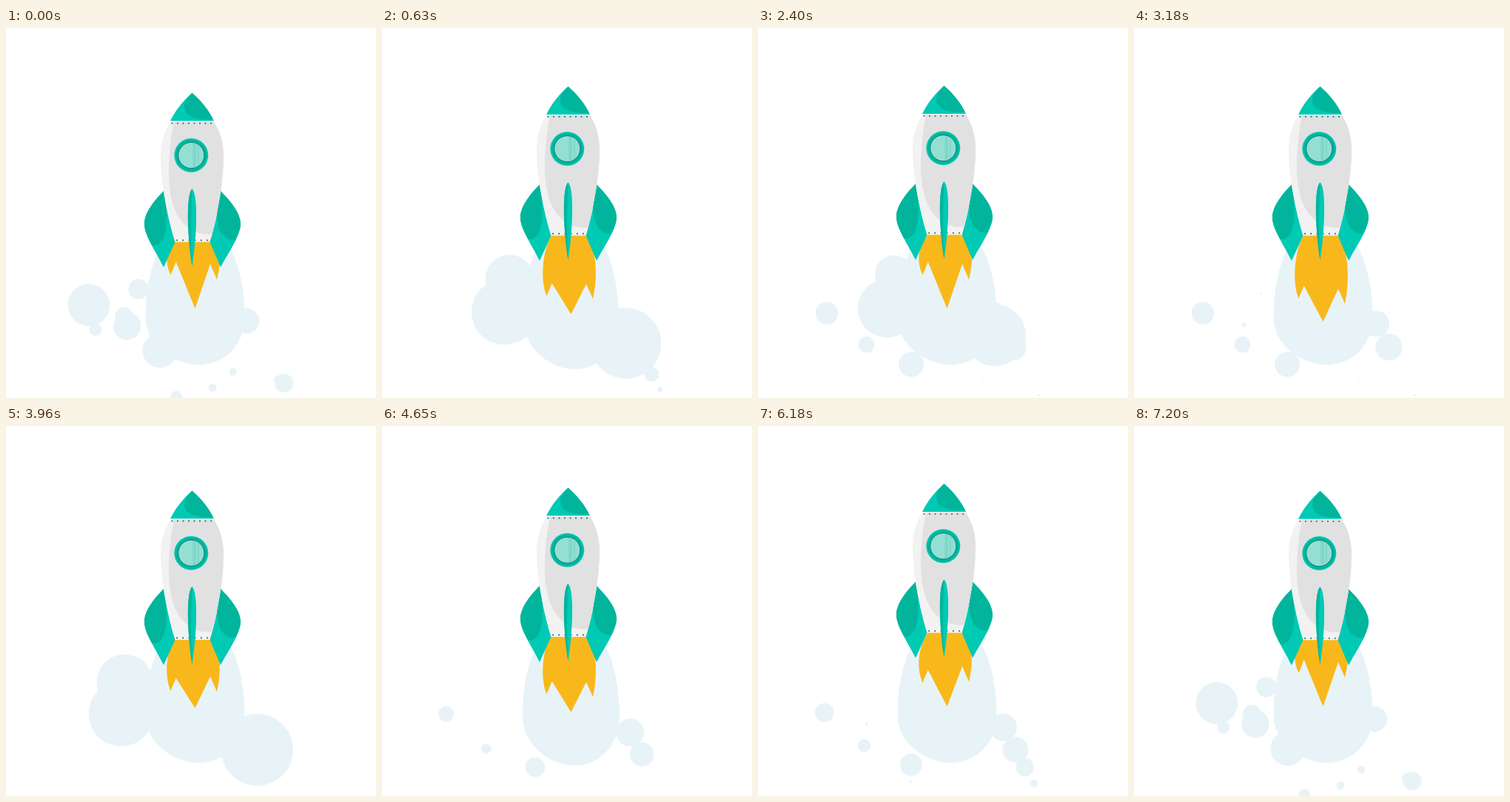
These frames come from a looping animation (500 px wide and 500 px high, 7.23 s). An HTML page:

```html
<!DOCTYPE html>
<html lang="en">
<head>
<meta charset="utf-8">
<title>Rocket</title>
<style>
html, body { margin: 0; width: 100%; height: 100%; overflow: hidden; background: #fff; }
svg { display: block; width: 100vw; height: 100vh; }
.smoke { fill: #e8f3f8; }
.light { fill: #00c9b4; }
.dark { fill: #00b59c; }
</style>
</head>
<body>
<svg viewBox="0 0 500 500">
  <path id="plume" class="smoke"/>
  <path id="puffs" class="smoke"/>
  <path id="flame" fill="#f8b81b"/>
  <g id="rocket">
    <path class="light" d="M213 210.500C204 220 187 238 187 255C187 271 203 293 213 313.500L228.500 279.500C222 258 217 236 213 210.500Z"/>
    <path class="dark" d="M213 210.500C204 220 187 238 187 255C187 265 192 274 197.500 284.500C213 286 219 265 216 229Z"/>
    <path class="light" d="M290 210.500C299 220 317 238 317 255C317 271 301 293 290 313.500L275.500 279.500C282 258 287 236 290 210.500Z"/>
    <path class="dark" d="M290 210.500C299 220 317 238 317 255C317 262 313 270 309.500 277C293 277 284 262 285.500 236Z"/>
    <path fill="#f2f2f2" d="M223 116H281C289 130 294 144 294 164C294 203 284 247 275.500 279.500H228.500C219 247 209 203 209 164C209 144 214 130 223 116Z"/>
    <path fill="#e1e1e1" d="M227 117H281C289 130 294 144 294 164C294 200 286 238 278.500 269C252 271 220 254 220 186C220 160 223 137 227 117Z"/>
    <path class="light" d="M251.500 78C263 88 274 101 281 116H222C229 101 240 88 251.500 78Z"/>
    <path class="dark" d="M251.500 78C263 88 274 101 280 114C258 115 241 110 241 96C241 91 243 86 251.500 78Z"/>
    <path stroke="#f8f8f8" d="M222.500 116.500H280.500"/>
    <g id="rivets" fill="#267f7a"></g>
    <circle class="light" cx="250.300" cy="162.300" r="23"/>
    <circle class="dark" cx="250.300" cy="162.300" r="21.500"/>
    <circle cx="250.300" cy="162.300" r="17.600" fill="#93dfd3" stroke="#0b7d70"/>
    <path fill="#80d6c9" d="M252.500 146H257V178.500H252.500ZM259 148H261V176H259Z"/>
    <path class="light" d="M251.500 207.500C259 214 259 264 251.500 312.500C244 264 244 214 251.500 207.500Z"/>
    <path class="dark" d="M251.500 207.500C244 214 244 264 251.500 312.500C249 270 250 235 251.500 207.500Z"/>
  </g>
</svg>
<script>
const LOOP = 7230, CYCLE = 7200, STEP = 30;
const get = id => document.getElementById(id);
const ease = u => (1 - Math.cos(Math.PI * Math.min(1, Math.max(0, u)))) / 2;
const circle = (x, y, r) => `M${x - r} ${y}a${r} ${r} 0 1 1 ${2 * r} 0a${r} ${r} 0 1 1 ${-2 * r} 0Z`;

// Every burst sends one puff down each route, after that route's delay.
const bursts = [300, 1370, 2150, 3540, 4770, 5110, 6370];
const route = (delay, life, from, to, size) => ({ delay, life, from, to, size });
const routes = [
  // left
  route(20, 1450, [218, 313], [68, 400], 40),
  route(0, 1050, [206, 362], [112, 412], 45),
  route(500, 860, [200, 350], [130, 452], 19),
  route(530, 650, [183, 363], [144, 406], 13.5),
  route(400, 720, [205, 332], [170, 360], 22),
  // below
  route(330, 1250, [210, 378], [206, 486], 24),
  route(530, 700, [228, 470], [232, 520], 8.5),
  route(330, 850, [302, 430], [271, 506], 8.5),
  route(330, 850, [318, 410], [303, 484], 8),
  // right
  route(0, 1100, [288, 378], [388, 494], 49),
  ...[30, 550, 730].map(delay => route(delay, 1150, [295, 340], [384, 504], 19)),
  route(400, 450, [298, 318], [326, 364], 9)
];

// A puff slows down on its way, swells early and then shrinks to nothing.
function puff({ life, from, to, size }, age) {
  const u = age / life, p = 1 - (1 - u) ** 1.5;
  const [x, y] = from.map((v, k) => v + (to[k] - v) * p);
  return circle(x, y, size * Math.sin(Math.PI * u ** .66) ** 2);
}

function puffPath(t) {
  let d = '';
  for (const r of routes) {
    for (const burst of bursts) {
      const age = (t - burst - r.delay + 2 * CYCLE) % CYCLE;
      if (age < r.life) d += puff(r, age);
    }
  }
  return d;
}

// The plume grows long and narrow around two moments.
function plumePath(t) {
  const s = ease(1 - Math.abs(t - 1230) / 840) + ease(1 - Math.abs(t - 5310) / 840);
  const x = 255.5 - s, w = 67 - 13 * s, neck = 52 - 12 * s, mid = 390 + 15 * s, end = 455 + 33 * s;
  return `M${x} 265C${x + neck} 265 ${x + w} 340 ${x + w} ${mid}C${x + w} ${mid + 38} ${x + 40} ${end} ${x + 5} ${end}` +
    `C${x - 30} ${end} ${x - w} ${mid + 38} ${x - w} ${mid}C${x - w} 340 ${x - neck} 265 ${x} 265Z`;
}

// All tongues flicker together, the middle one in the sharpest bursts.
function flamePath(t) {
  const b = Math.sin(Math.PI * t / 480) ** 2, soft = Math.sqrt(b);
  const left = 334 + 34 * soft, right = 340 + 38 * b;
  return `M229 276V280C219 296 212 ${left - 25} 222.500 ${left}L229.700 ${316 + 35 * soft}` +
    `L255.500 ${379 + 34 * b ** 4}L276 ${319 + 39 * b}L285 ${right}C291 ${right - 25} 292 300 275 280V276Z`;
}

// Rise, hover, sink, rest; the last rest lasts until the loop ends.
function rocketDrop(t) {
  const bob = 980, depth = 9.8;
  if (t >= 7 * bob) return depth;
  const p = t % bob;
  return depth * (1 - ease(p / 300) + ease((p - 570) / 300));
}

const rivetRow = (x, y, gap, count) =>
  `<path d="${Array.from({ length: count }, (_, i) => circle(x + i * gap, y, 1.1)).join('')}"/>`;
get('rivets').innerHTML = rivetRow(224.5, 119, 7.5, 8) + rivetRow(231, 277, 8.2, 6);

const start = performance.now();
function draw(now) {
  const t = Math.floor(Math.max(0, now - start) % LOOP / STEP) * STEP;
  get('puffs').setAttribute('d', puffPath(t));
  get('plume').setAttribute('d', plumePath(t));
  get('flame').setAttribute('d', flamePath(t));
  get('rocket').setAttribute('transform', `translate(0 ${rocketDrop(t)})`);
  requestAnimationFrame(draw);
}
draw(start);
</script>
</body>
</html>
```
